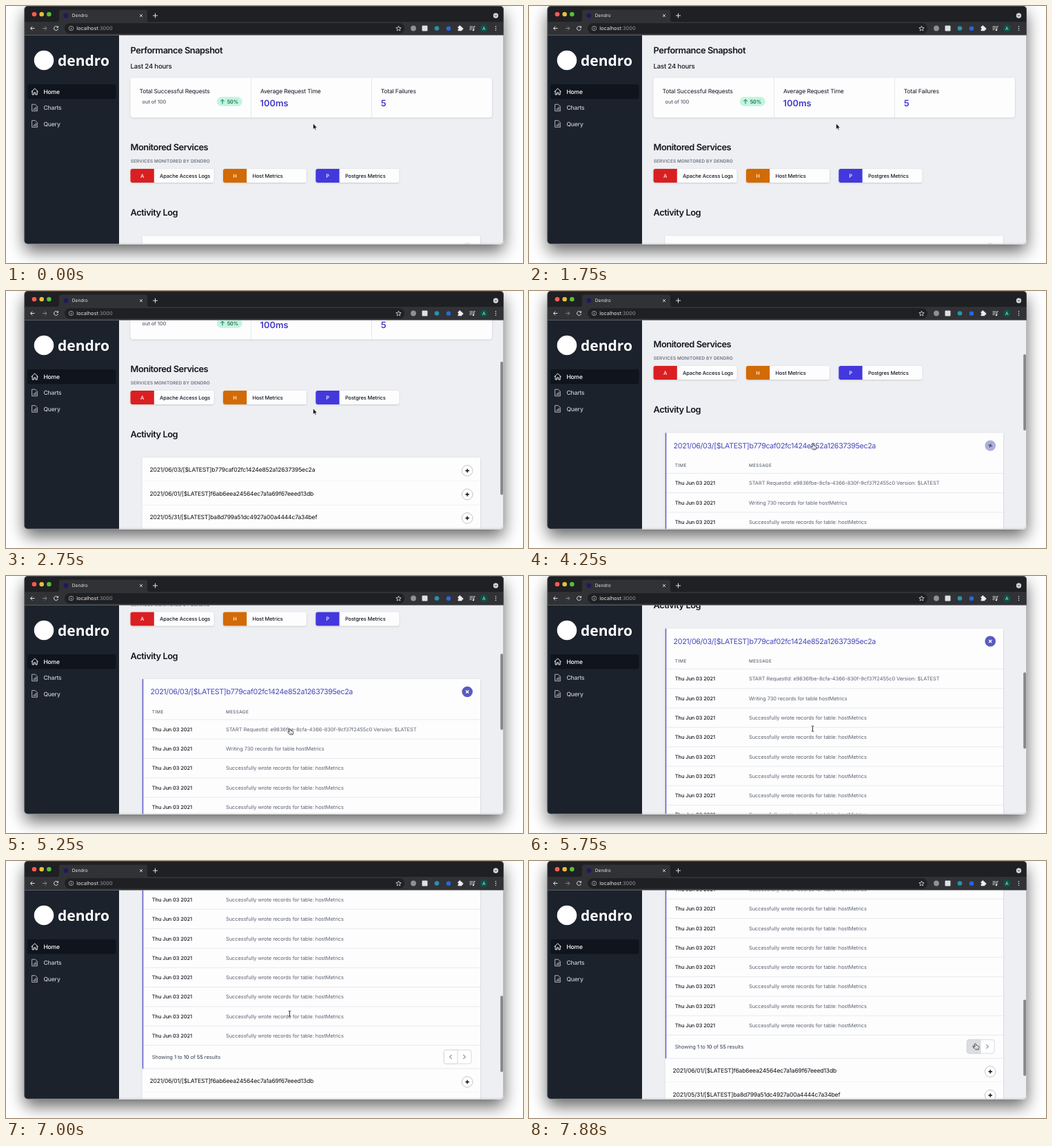
These frames come from a looping animation (750 by 374 pixels, 8 s). An HTML page:

```html
<!DOCTYPE html>
<html lang="en">
<head>
<meta charset="utf-8">
<title>Dendro</title>
<style>
html, body { margin: 0; width: 100%; height: 100%; overflow: hidden; background: #fff; }
#shadow { position: absolute; left: 26.5px; top: 0; width: 695.5px; height: 346.5px;
  border-radius: 5px; box-shadow: 0 10px 23px rgba(0,0,0,.6); }
svg { position: absolute; left: 0; top: 0; display: block; }
text { font-family: Inter, "Liberation Sans", sans-serif; text-rendering: geometricPrecision; white-space: pre; }
</style>
</head>
<body>
<div id="shadow"></div>
<svg id="stage" width="750" height="374" viewBox="0 0 750 374"></svg>
<script>
const INK = '#14161f', GRAY = '#5c6370', INDIGO = '#4338ca';

// Text styles: size, weight, letter spacing (em)
const STYLES = {
  h2: [12.84, 600, -.036], big: [12.84, 600, 0], title: [10.7, 400, -.0315],
  h3: [9.63, 500, -.024], base: [8.56, 400, -.02], nav: [8.56, 500, -.02],
  small: [7.48, 400, -.0075], strong: [7.48, 500, -.014],
  caps: [6.42, 600, .022], th: [6.42, 500, .05], tab: [6.6, 400, 0], url: [7.4, 400, 0]
};

// y is the middle of the capitals
function text(str, x, y, style, fill = INK, extra = '') {
  const [size, weight, track] = STYLES[style];
  return `<text x="${x}" y="${y + size * .364}" font-size="${size}" font-weight="${weight}"
    letter-spacing="${track * size}" fill="${fill}" ${extra}>${str}</text>`;
}
const rect = (x, y, w, h, fill, r = 0, extra = '') =>
  `<rect x="${x}" y="${y}" width="${w}" height="${h}" rx="${r}" fill="${fill}" ${extra}/>`;
const circle = (x, y, r, fill, extra = '') => `<circle cx="${x}" cy="${y}" r="${r}" fill="${fill}" ${extra}/>`;
const line = (d, color, w = 1, extra = '') =>
  `<path d="${d}" fill="none" stroke="${color}" stroke-width="${w}" ${extra}/>`;
const round = 'stroke-linecap="round" stroke-linejoin="round"';
const rule = (y, color = '#e3e5ea') => line(`M198 ${y}H688`, color, .8);
const card = (x, y, w, h, r) => rect(x, y, w, h, '#fdfdfe', r, 'filter="url(#soft)"');

function chrome() {
  const light = '#e3e4e7';
  let s = rect(26, 0, 697, 23.5, '#1f2023') + rect(26, 23, 697, 19.5, '#313236');
  ['#fc5b57', '#e5bf3c', '#57c038'].forEach((c, i) => s += circle(41 + i * 10.7, 12, 3.3, c));
  s += `<path d="M74 23q3 0 3-3V8.500q0-3 3-3H202q3 0 3 3V20q0 3 3 3Z" fill="#313236"/>`;
  s += circle(87, 14, 3.4, '#1d1a5c') + text('Dendro', 95.8, 14, 'tab', light);
  s += line('M194 12l4 4m0-4l-4 4', light, .9) + line('M213 14h7m-3.500-3.500v7', light, 1);
  s += circle(710.5, 14, 3.7, '#d4d5d8') + line('M709 13.300l1.500 1.600 1.500-1.600', '#1f2023', .9);
  s += rect(85, 25, 493, 15.200, '#1f2023', 7.600);
  s += line('M41.500 32.500H35.500m2.800-2.800l-2.800 2.800 2.800 2.800', light, 1);
  s += line('M53 32.500h6m-2.800-2.800l2.800 2.800-2.800 2.800', '#85878b', 1);
  s += line('M75 30.700a3 3 0 1 0 .5 2.500M75.600 29.300v2h-2', light, 1);
  s += circle(94.5, 32.5, 3.2, 'none', 'stroke="#b6b8bb" stroke-width=".8"') +
    line('M94.500 32v2.200m0-3.700v.8', '#b6b8bb', .9);
  s += text('localhost<tspan fill="#92959a">:3000</tspan>', 102.3, 32.5, 'url', light);
  s += line('M569.500 29l1 2.500 2.700.2-2.100 1.700.7 2.600-2.300-1.400-2.300 1.400.7-2.600-2.100-1.700 2.700-.2Z', light, .8);
  s += circle(591, 32.5, 3.9, '#8f9194') + rect(603.5, 28.5, 8, 8, '#dfe0e2', 1);
  s += circle(625, 32.5, 3.3, '#2792ac') + circle(642, 32.7, 3.2, '#2a66dd');
  s += rect(655.500, 30, 6, 6.300, '#eee', .8) + circle(658.3, 29.7, 1.5, '#eee') + circle(661.9, 33, 1.5, '#eee') +
    circle(655.5, 33.2, 1.1, '#313236');
  s += line('M672.500 30h5m-5 2.200h5m-5 2.200h3M678.800 35V29.800h2', light, .9) + circle(677.9, 35, 1.2, light);
  s += circle(693.2, 32.5, 5.4, '#0a5348') + text('A', 693.2, 32.5, 'tab', '#dcebe6', 'text-anchor="middle"');
  [-2.7, 0, 2.7].forEach(d => s += circle(710.5, 32.5 + d, .8, light));
  return s;
}

function sidebar() {
  const dim = '#c9cdd4';
  let s = rect(26, 42.5, 138, 305, '#1b222c') + circle(55, 79, 14.3, '#fff');
  s += `<text x="75" y="86.800" font-size="21" font-weight="600" fill="#fff"
    style="font-family:'Noto Sans','Open Sans',sans-serif">dendro</text>`;
  s += rect(31, 114, 128.5, 21.2, '#0f141d', 3);
  s += line('M37 124.700l4.700-4.700 4.700 4.700M38.200 123.700v5.300h2.300v-3h2.400v3h2.300v-5.300', '#fff', .95, round);
  s += text('Home', 54.4, 124.7, 'nav', '#fff');
  ['Charts', 'Query'].forEach((name, i) => {
    const y = 148 + i * 23.5;
    s += line(`M38 ${y - 4.8}h4.500l2.900 2.900v6.700h-7.400ZM40 ${y + 3}v-1.200m1.700 1.200v-2.500m1.700 2.500v-4`, dim, .85, round);
    s += text(name, 54.4, y, 'nav', dim);
  });
  return s;
}

function overview() {
  let s = text('Performance Snapshot', 180.6, 64.5, 'h2') + text('Last 24 hours', 180.6, 87.5, 'h3');
  s += card(180.5, 104.5, 524.5, 57.7, 4) + line('M355.500 104.500v57.700M530.500 104.500v57.700', '#e3e5ea', .9);
  s += text('Total Successful Requests', 193.5, 124, 'base') + text('out of 100', 197.6, 139, 'strong', GRAY);
  s += rect(305.8, 132.3, 37, 13.4, '#c3f5de', 6.7) + text('50%', 320.7, 139, 'strong', '#0b5c46');
  s += line('M314 142v-5.800m-2.400 2.400l2.400-2.400 2.400 2.400', '#0b6e50', 1, round);
  s += text('Average Request Time', 369, 124, 'base') + text('100ms', 368.6, 141.3, 'big', INDIGO);
  s += text('Total Failures', 543.7, 124, 'base') + text('5', 543.7, 141.3, 'big', INDIGO);
  s += text('Monitored Services', 180.6, 205.5, 'h2') + text('SERVICES MONITORED BY DENDRO', 180.8, 226, 'caps', '#6b7280');
  [['A', 'Apache Access Logs', '#d91f22'], ['H', 'Host Metrics', '#d26a05'], ['P', 'Postgres Metrics', '#4338dd']]
    .forEach(([letter, name, color], i) => {
      const x = 180.5 + i * 134.4;
      s += card(x, 237, 121, 20, 3);
      s += `<path d="M${x + 34.300} 237v20h-31.300q-3 0-3-3v-14q0-3 3-3Z" fill="${color}"/>`;
      s += text(letter, x + 17.2, 247, 'strong', '#fff', 'text-anchor="middle"') + text(name, x + 42.6, 247, 'strong');
    });
  return s + text('Activity Log', 180.6, 300.5, 'h2');
}

const LOG_TOP = 334.5, ROW = 34.5, GROWTH = 341.5, LINE = 28.3;
const logs = [
  '2021/06/03/[$LATEST]b779caf02fc1424e852a12637395ec2a',
  '2021/06/01/[$LATEST]f6ab6eea24564ec7a1a69f67eeed13db',
  '2021/05/31/[$LATEST]ba8d799a51dc4927a00a4444c7a34bef',
  '2021/05/30/[$LATEST]4c0e91d7ab35482f9d6e20b1f73a85c6'
];
const plus = (x, y) => line(`M${x - 2.8} ${y}h5.600m-2.800-2.800v5.600`, '#111', 1.4);

function logRow(i) {
  const y = LOG_TOP + ROW * i;
  return rect(197.7, y, 490.3, ROW, '#fdfdfe') + text(logs[i], 208.5, y + 17.5, 'base', '#0c0d12') +
    circle(669.2, y + 19, 7.8, '#fff', 'stroke="#b9bcc2" stroke-width=".9"') + plus(669.2, y + 19) + rule(y + ROW);
}

function openLog() {
  let s = rect(197.7, LOG_TOP, 490.3, ROW + GROWTH, '#fdfdfe');
  s += text(logs[0], 209.6, 353, 'title', '#4548b8');
  s += `<g id="close" transform="translate(669.200 353)"><circle r="7.800"/><path d="M-2.800 0h5.600m-2.800-2.800v5.600" stroke-width="1.400"/></g>`;
  s += text('TIME', 211.8, 382, 'th', GRAY) + text('MESSAGE', 319, 382, 'th', GRAY) + rule(393.4);
  for (let i = 0; i < 10; i++) {
    const y = 407.6 + LINE * i;
    const msg = i === 0 ? 'START RequestId: e9836fbe-8cfa-4366-830f-9cf37f2455c0 Version: $LATEST'
      : i === 1 ? 'Writing 730 records for table hostMetrics'
      : 'Successfully wrote records for table: hostMetrics';
    s += text('Thu Jun 03 2021', 211.8, y, 'strong') + text(msg, 319, y, 'small', GRAY) + rule(393.4 + LINE * (i + 1));
  }
  const b = n => `<tspan font-weight="500">${n}</tspan>`;
  s += text(`Showing ${b(1)} to ${b(10)} of ${b(55)} results`, 211.8, 693, 'small', '#374151');
  s += rect(635.3, 683, 39.7, 20, '#fff', 3, 'stroke="#d1d5db" stroke-width=".9"');
  s += `<path id="prev" d="M655 683v20h-16.700q-3 0-3-3v-14q0-3 3-3Z" stroke="#d1d5db" stroke-width=".9"/>`;
  s += line('M646.300 690.300l-2.700 2.700 2.700 2.700M663.700 690.300l2.700 2.700-2.700 2.700', '#4b5563', 1, round);
  return s + rule(710.3, '#d9dbe1') + rect(197.8, LOG_TOP, 1.4, GROWTH + ROW, '#5653c4');
}

const CURSORS = {
  arrow: '<path d="M0 0V8.400L1.900 6.700 3.200 9.500 4.500 8.900 3.300 6.200H5.900Z" fill="#111" stroke="#fff" stroke-width=".6"/>',
  hand: '<path d="M-.9 .7q.9-1.100 1.800 0L1.500 3.200 4.600 4q.9.400.8 1.400L4.700 8.800H.2L-2.600 5.600q-.4-1 .6-1.100L-.3 5.300Z" ' +
    'fill="#fff" stroke="#222" stroke-width=".8" stroke-linejoin="round"/><path d="M1.300 6v1.700M2.900 6v1.700" stroke="#222" stroke-width=".6"/>',
  beam: '<path d="M-1.700-3.800q1.700 0 1.700 1v6q0 1-1.700 1M1.700-3.800q-1.700 0-1.700 1M1.700 4.200q-1.700 0-1.700-1" fill="none" stroke="#222" stroke-width=".9"/>'
};

const stage = document.getElementById('stage');
stage.innerHTML = `<defs>
  <clipPath id="win"><rect x="26.500" y="0" width="695.500" height="346.500" rx="5"/></clipPath>
  <clipPath id="view"><rect x="164" y="42.500" width="558.500" height="304"/></clipPath>
  <filter id="soft" x="-5%" y="-20%" width="110%" height="150%">
    <feDropShadow dx="0" dy=".7" stdDeviation=".9" flood-color="#000" flood-opacity=".2"/></filter>
</defs>
<g clip-path="url(#win)">${chrome()}${sidebar()}
  <g clip-path="url(#view)">${rect(164, 42, 560, 306, '#eeeff2')}
    <g id="page">${overview()}
      <g filter="url(#soft)"><g id="shut">${logRow(0)}</g><g id="open">${openLog()}</g>
      <g id="rest">${logRow(1)}${logRow(2)}${logRow(3)}</g></g></g>
    <rect id="thumb" x="717.200" width="3.800" rx="1.900" fill="#85878b"/>
  </g>
  ${line('M26 42.300H723', '#55575b', .6)}
  ${rect(26.9, .4, 694.7, 345.7, 'none', 4.7, 'stroke="#77797d" stroke-opacity=".6" stroke-width=".8"')}
</g>
<g id="cursor">${Object.entries(CURSORS).map(([k, v]) => `<g id="${k}">${v}</g>`).join('')}</g>`;

const $ = Object.fromEntries([...stage.querySelectorAll('g[id], rect[id], path[id]')].map(n => [n.id, n]));
const closeDisc = $.close.firstChild, closeMark = $.close.lastChild;

// Motion tables: time, values
const SCROLL = [[2125, 0], [2250, 16], [2375, 44], [2500, 70], [2625, 86], [2750, 92], [3000, 118], [3250, 128],
  [5000, 128], [5125, 148], [5250, 184.5], [5500, 228], [5750, 258], [6000, 278], [6250, 294], [6500, 316],
  [6750, 368], [7000, 408], [7250, 423]];
const POINTER_X = [[3250, 445.5], [3875, 411.5], [7125, 411.5], [7625, 647.5]];
const POINTER_Y = [[3250, 171], [3875, 222], [7125, 222], [7625, 265.5]];
const SHAPES = [[0, 'arrow'], [3625, 'hand'], [5500, 'beam'], [7125, 'arrow'], [7625, 'hand']];

function at(table, t) {
  const i = table.findIndex(k => k[0] > t);
  if (i === 0) return table[0][1];
  if (i < 0) return table[table.length - 1][1];
  const [t0, a] = table[i - 1], [t1, b] = table[i];
  return a + (b - a) * (t - t0) / (t1 - t0);
}
const mix = (a, b, k) => `rgb(${a.map((v, i) => Math.round(v + (b[i] - v) * k))})`;
const show = (node, on) => node.setAttribute('display', on ? 'inline' : 'none');
const move = (node, x, y) => node.setAttribute('transform', `translate(${x} ${y})`);

const LOOP = 8000, STEP = 125;
function draw(ms) {
  const t = Math.floor((ms % LOOP + 1) / STEP) * STEP;
  const opened = t >= 4250, scroll = at(SCROLL, t);
  move($.page, 0, -scroll);
  show($.shut, !opened);
  show($.open, opened);
  move($.rest, 0, opened ? GROWTH : 0);

  const k = Math.max(0, Math.min(1, (t - 4125) / 250));
  closeDisc.setAttribute('fill', mix([255, 255, 255], [88, 91, 190], k));
  closeMark.setAttribute('stroke', mix([17, 17, 17], [255, 255, 255], k * k));
  closeMark.setAttribute('transform', `rotate(${45 * k})`);
  $.prev.setAttribute('fill', t >= 7625 ? '#dcdde1' : '#fff');

  show($.thumb, t > 2125);
  $.thumb.setAttribute('y', 44.3 + scroll * (opened ? .372 : .635));
  $.thumb.setAttribute('height', opened ? 111 : 194);

  move($.cursor, at(POINTER_X, t), at(POINTER_Y, t));
  const shape = SHAPES.filter(s => s[0] <= t).pop()[1];
  Object.keys(CURSORS).forEach(name => show($[name], name === shape));
}

const start = performance.now();
function tick() {
  draw(performance.now() - start);
  requestAnimationFrame(tick);
}
tick();
</script>
</body>
</html>
```
